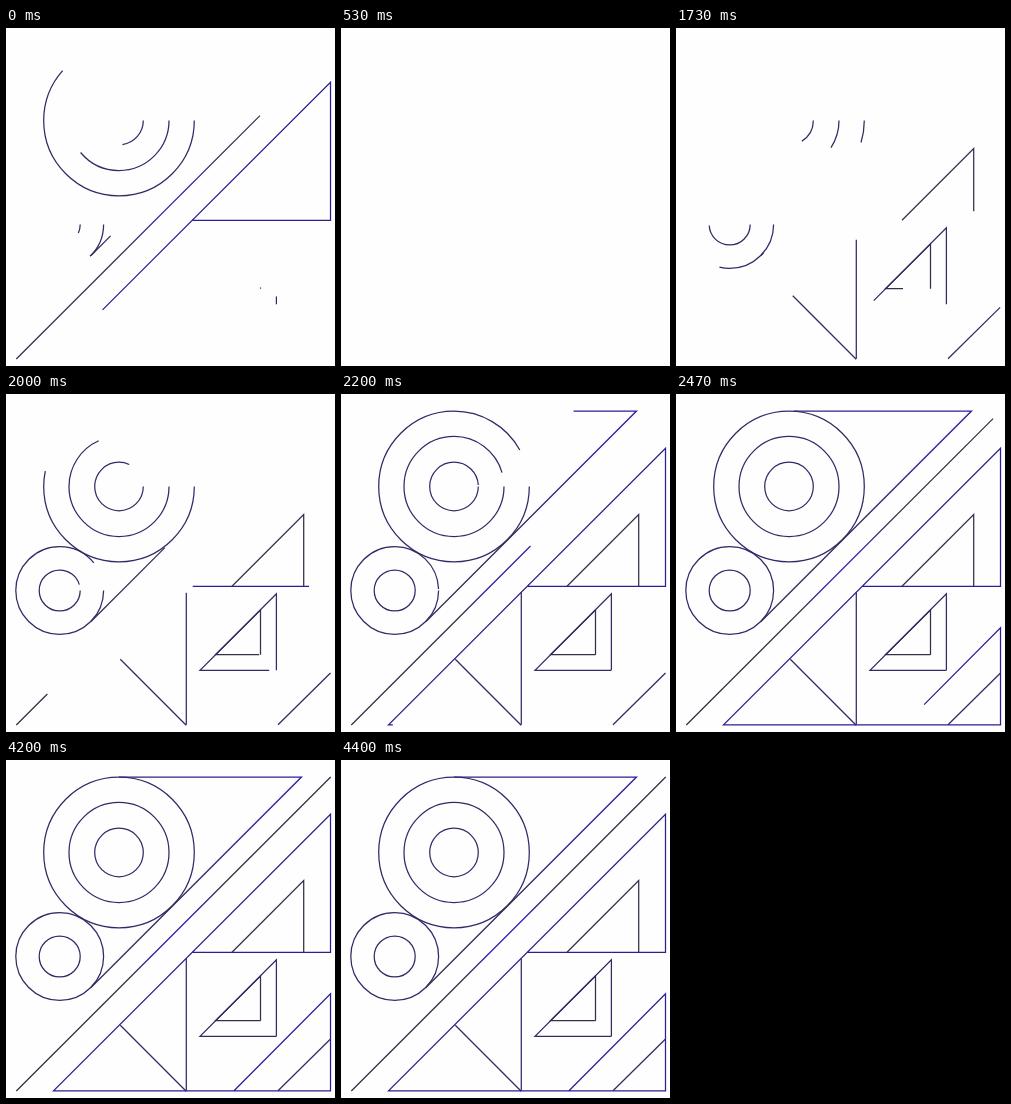
Animation, 329 px wide and 338 px high, one loop 4.99 s. Source, as an HTML page:

```html
<!DOCTYPE html>
<html lang="en">
<head>
<meta charset="utf-8">
<title>Line drawing</title>
<style>
  html, body { margin: 0; width: 100%; height: 100%; overflow: hidden; background: #fefefe; }
  svg { display: block; width: 100%; height: 100%; }
  path { fill: none; stroke-width: 1.25; }
</style>
</head>
<body>
<svg id="stage" viewBox="0 0 329 338">
  <defs>
    <linearGradient id="long" gradientUnits="userSpaceOnUse" x1="10" y1="331" x2="325" y2="17">
      <stop offset=".36" stop-color="#302d48"/>
      <stop offset=".44" stop-color="#2a1fa8"/>
      <stop offset=".56" stop-color="#2a1fa8"/>
      <stop offset=".64" stop-color="#302d48"/>
    </linearGradient>
    <linearGradient id="top" gradientUnits="userSpaceOnUse" x1="85" y1="228" x2="295" y2="17">
      <stop offset=".4" stop-color="#302d54"/>
      <stop offset=".8" stop-color="#2a1fa0"/>
    </linearGradient>
  </defs>
</svg>
<script>
const LOOP = 4990, FRAME = 1000 / 15, ERASE_END = 530, ERASE_TIME = 1050;
const NAVY = '#302a66', DARK = '#33304c', BLUE = '#2a2090';

const circle = (x, y, r) =>
  `M${x + r} ${y}a${r} ${r} 0 0 1 ${-2 * r} 0a${r} ${r} 0 0 1 ${2 * r} 0`;

// path, colour, draw start, draw duration, time at which erasing ends
const parts = [
  ['M272 330.8L324.5 279', NAVY, 697, 1250, 0],
  ['M180.2 331.2L114.3 265.3', NAVY, 750, 1330, 0],
  ['M226 192.3L297.7 120.5V192.3', DARK, 816, 1281, 0],
  ['M180.3 330.8V198.5', NAVY, 885, 1274, 0],
  ['M254.5 260.7V216L209.5 260.7H254.5', DARK, 942, 1291, 187],
  ['M270.4 276.3V199.8L194 276.3H270.4', NAVY, 1002, 1317, 260],
  [circle(53.7, 196.5, 20.5), NAVY, 1122, 1230, 319],
  [circle(53.7, 196.5, 43.9), NAVY, 1211, 1200, 374],
  [circle(113, 92.5, 24.3), NAVY, 1304, 1142, 430],
  [circle(113, 92.5, 50), NAVY, 1349, 1176, 493],
  [circle(113, 92.5, 75.3), NAVY, 1413, 1155, 558],
  ['M85 227.5L295.5 17H113', 'url(#top)', 1533, 1150, 306],
  ['M186.7 192.3H324.5V54.3L47.5 330.8H324.5V233.8L228 330.8', BLUE, 1640, 1080, 527],
  ['M10.3 331L324.7 17', 'url(#long)', 1640, 1080, 620],
].map(([d, stroke, start, duration, gone]) => {
  const path = document.createElementNS('http://www.w3.org/2000/svg', 'path');
  path.setAttribute('d', d);
  path.setAttribute('stroke', stroke);
  document.getElementById('stage').append(path);
  return { path, start, duration, gone, length: path.getTotalLength() };
});

function ease(u) {
  u = Math.min(1, Math.max(0, u));
  return u < 0.5 ? 8 * u ** 4 : 1 - 8 * (1 - u) ** 4;
}

function render(now) {
  // The motion advances in steps of 1/15 s.
  const t = Math.floor((now % LOOP + 4) / FRAME) * FRAME;
  for (const { path, start, duration, gone, length } of parts) {
    const shown = t < ERASE_END
      ? ease((gone - t) / ERASE_TIME)
      : ease((t - start) / duration);
    const dash = shown * length;
    path.style.visibility = dash < 0.6 ? 'hidden' : 'visible';
    path.style.strokeDasharray = shown > 0.9999 ? 'none' : `${dash} ${length + 9}`;
  }
}

const begin = performance.now();
function tick() {
  render(performance.now() - begin);
  requestAnimationFrame(tick);
}
tick();
</script>
</body>
</html>
```
